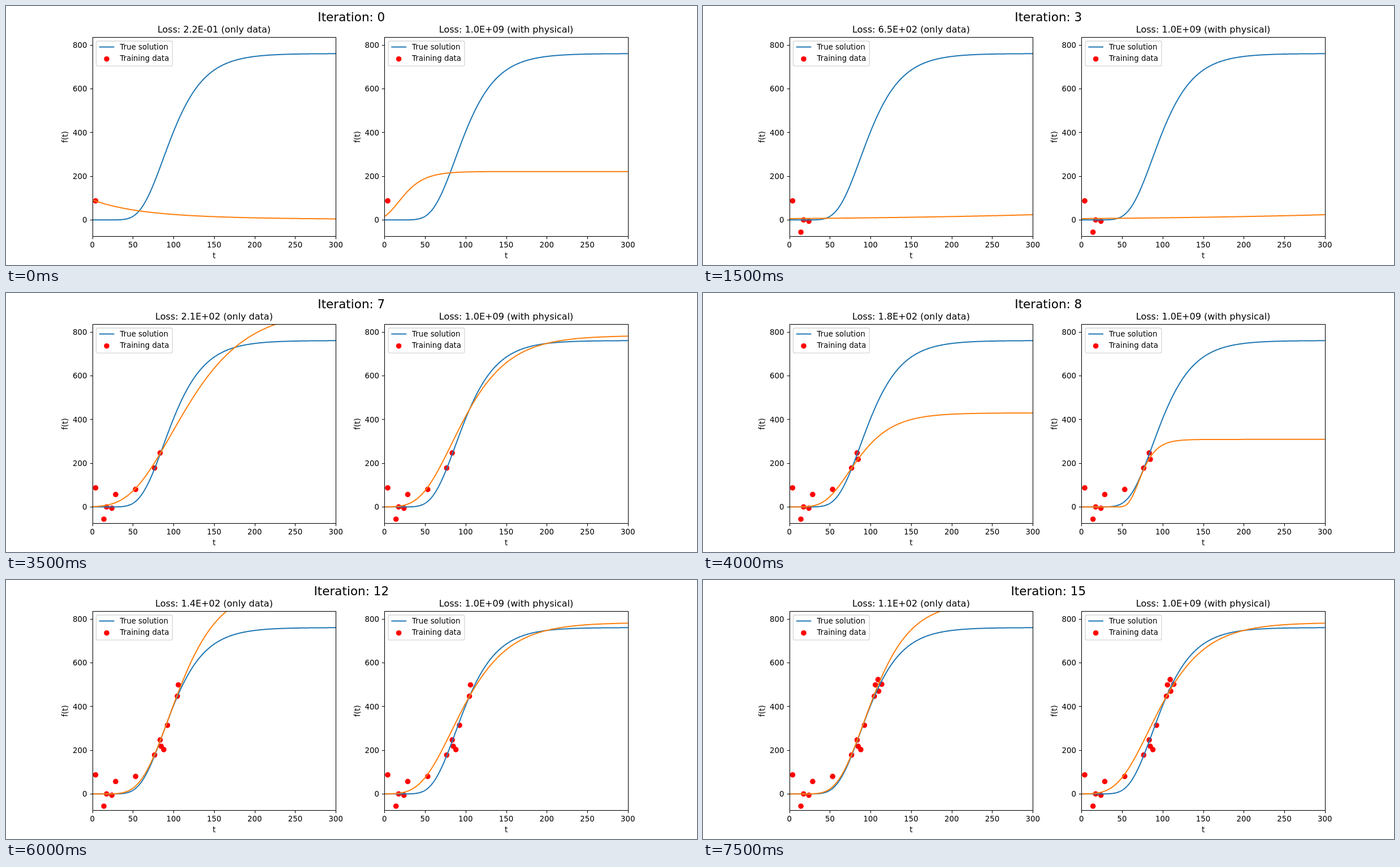
An HTML page with a canvas for the animation above (8 s loop, 1222 px wide and 458 px high).

```html
<!DOCTYPE html>
<html lang="en">
<head>
<meta charset="utf-8">
<title>Curve fitting</title>
<style>
  html, body { margin: 0; width: 100%; height: 100%; overflow: hidden; background: #fff; }
  canvas { display: block; }
</style>
</head>
<body>
<canvas id="stage" width="1222" height="458"></canvas>
<script>
const ctx = document.getElementById('stage').getContext('2d');
const STEP = 500;
const BLUE = '#1f77b4', ORANGE = '#ff7f0e', RED = '#ff0000';
const LEFT = 152.75, GAP = 516.57, WIDTH = 430.48, TOP = 55, BOTTOM = 407.6;
const ZERO = 378.3, UNIT = 0.3865;

// Growth curve: K * exp(-b * exp(-c t)), stored as [K, b, c]
const growth = ([K, b, c]) => t => K * Math.exp(-b * Math.exp(-c * t));
const truth = [761, 23.2, 0.036];

// Samples as [t, value]; one more appears at each iteration
const samples = [
  [4, 87], [14.2, -56], [17.5, 0], [24, -6], [28.7, 57], [53.3, 80],
  [76.7, 178], [83.5, 247], [84.8, 218], [88, 203], [92.5, 314],
  [104.7, 447], [106, 499], [109.3, 523], [110, 470], [113.8, 502]
];

const slow = [125500, 9.95, 0.0005];
const dataFits = [
  ['2.2E-01', [0.619, -5, 0.003]],
  ['7.8E+02', [1e-10, -30, 0.0218]],
  ['3.5E+02', [1e-6, -20, 0.0225]],
  ['6.5E+02', slow],
  ['5.0E+02', [16.5, 1100, 1.4]],
  ['3.0E+02', [85, 2670, 0.3]],
  ['2.7E+02', [700, 4.88, 0.0165]],
  ['2.1E+02', [907, 6.68, 0.0195]],
  ['1.8E+02', [430, 12, 0.034]],
  ['1.6E+02', [330, 14, 0.041]],
  ['1.4E+02', [739, 7.69, 0.0225]],
  ['1.4E+02', [1150, 10.5, 0.0225]],
  ['1.4E+02', [950, 15.22, 0.0289]],
  ['1.3E+02', [1000, 14.8, 0.0277]],
  ['1.2E+02', [930, 15.8, 0.0295]],
  ['1.1E+02', [880, 17.46, 0.0313]]
];

const steep = [309, 319, 0.082], settled = [784, 8.67, 0.0261];
const physicalFits = [
  [221.5, 2.63, 0.0564], [60, 1.2, 0.01], [8, 0.3, 0.01], slow,
  [-57, 3, 0.02], [689, 6.61, 0.0218], [735, 7.3, 0.0235], settled,
  steep, steep, steep, [700, 7, 0.022],
  settled, settled, settled, settled
];

const snap = v => Math.round(v) + 0.5;
const yOf = v => ZERO - v * UNIT;

function text(str, x, y, size, align = 'center') {
  ctx.font = `${size}px "DejaVu Sans", sans-serif`;
  ctx.textAlign = align;
  ctx.fillStyle = '#000';
  ctx.fillText(str, x, y);
}

function line(x1, y1, x2, y2) {
  ctx.beginPath();
  ctx.moveTo(x1, y1);
  ctx.lineTo(x2, y2);
  ctx.stroke();
}

function dot(x, y) {
  ctx.fillStyle = RED;
  ctx.beginPath();
  ctx.arc(x, y, 4.8, 0, 2 * Math.PI);
  ctx.fill();
}

function curve(params, xOf, color) {
  const f = growth(params);
  ctx.strokeStyle = color;
  ctx.lineWidth = 2;
  ctx.lineJoin = 'round';
  ctx.beginPath();
  for (let t = 0; t <= 300; t += 0.5) ctx.lineTo(xOf(t), yOf(f(t)));
  ctx.stroke();
}

function axes(x0, xOf) {
  ctx.strokeStyle = '#000';
  ctx.lineWidth = 1.07;
  const l = snap(x0), r = snap(x0 + WIDTH), t = TOP + 0.5, b = 407.5;
  ctx.strokeRect(l, t, r - l, b - t);
  for (let v = 0; v <= 300; v += 50) {
    const x = snap(xOf(v));
    line(x, b, x, b + 4.7);
    text(v, xOf(v), 427, 13.33);
  }
  for (let v = 0; v <= 800; v += 200) {
    const y = Math.floor(yOf(v)) + 0.5;
    line(l - 4.7, y, l, y);
    text(v, x0 - 9.3, yOf(v) + 4.9, 13.33, 'right');
  }
  text('t', x0 + WIDTH / 2, 446, 13.33);
  ctx.save();
  ctx.translate(x0 - 43.7, 231.5);
  ctx.rotate(-Math.PI / 2);
  text('f(t)', 0, 0, 13.33);
  ctx.restore();
}

function legend(x0) {
  ctx.fillStyle = 'rgba(255,255,255,0.8)';
  ctx.strokeStyle = 'rgba(204,204,204,0.8)';
  ctx.lineWidth = 1.33;
  ctx.beginPath();
  ctx.roundRect(x0 + 6.8, 62, 134.8, 44.2, 2.7);
  ctx.fill();
  ctx.stroke();
  ctx.strokeStyle = BLUE;
  ctx.lineWidth = 2;
  line(x0 + 12, 72.5, x0 + 38.7, 72.5);
  dot(x0 + 25.3, 93.7);
  text('True solution', x0 + 48.8, 77.3, 13.33, 'left');
  text('Training data', x0 + 48.8, 97.3, 13.33, 'left');
}

function panel(x0, title, fit, count) {
  const xOf = t => x0 + t * WIDTH / 300;
  ctx.save();
  ctx.beginPath();
  ctx.rect(x0, TOP, WIDTH, BOTTOM - TOP);
  ctx.clip();
  for (const [t, v] of samples.slice(0, count)) dot(xOf(t), yOf(v));
  curve(truth, xOf, BLUE);
  curve(fit, xOf, ORANGE);
  ctx.restore();
  axes(x0, xOf);
  legend(x0);
  text(title, x0 + WIDTH / 2, 47, 16.05);
}

function draw(i) {
  ctx.fillStyle = '#fff';
  ctx.fillRect(0, 0, 1222, 458);
  text(`Iteration: ${i}`, 610.8, 26.7, 21.5);
  const [loss, fit] = dataFits[i];
  panel(LEFT, `Loss: ${loss} (only data)`, fit, i + 1);
  panel(LEFT + GAP, 'Loss: 1.0E+09 (with physical)', physicalFits[i], i + 1);
}

const start = performance.now();
let shown = -1;
function tick() {
  const i = Math.floor((performance.now() - start) / STEP) % samples.length;
  if (i !== shown) draw(shown = i);
  requestAnimationFrame(tick);
}
tick();
</script>
</body>
</html>
```
